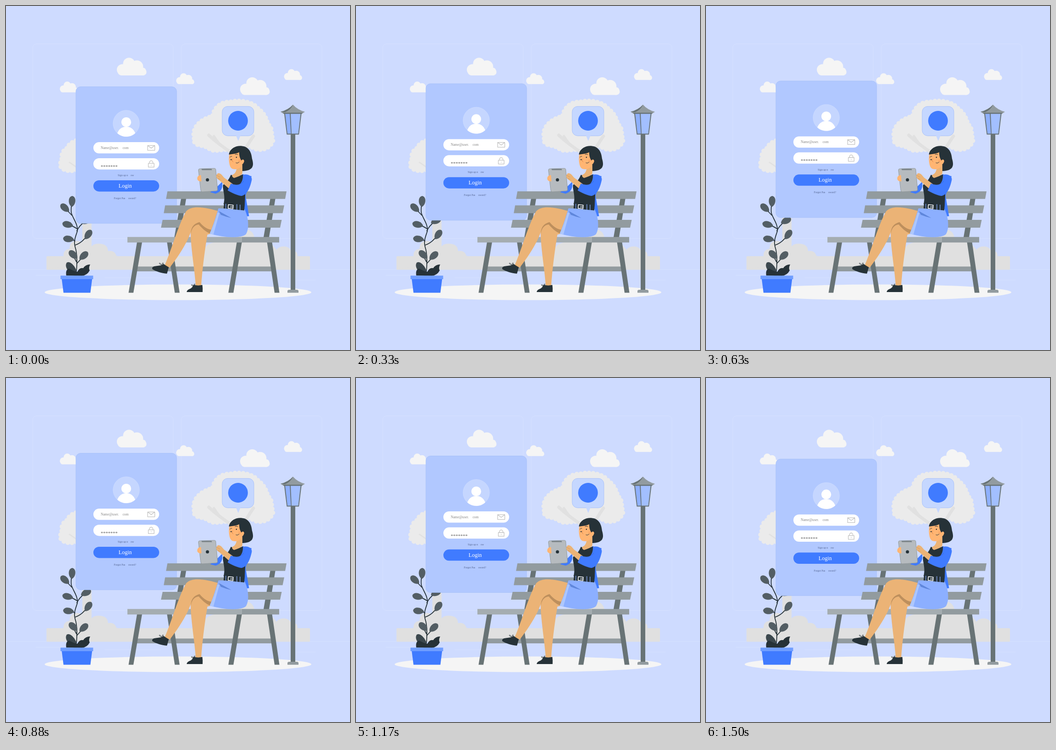
Animation, 748 px wide and 748 px high, one loop 1540 ms. Source, as an HTML page:

```html
<!DOCTYPE html>
<html lang="en">
<head>
<meta charset="utf-8">
<title>Login</title>
<style>
  html, body { margin: 0; width: 100%; height: 100%; overflow: hidden; background: #cedbff; }
  svg { display: block; width: 100%; height: 100%; }
  text { font-family: "Liberation Serif", "Times New Roman", serif; white-space: pre; }
  .steel { fill: #929b9f; }
  .iron { fill: #687375; }
  .ink { fill: #263238; }
  .skin { fill: #ebb376; }
  .blue { fill: #407bff; }
  .pale { fill: #e0e0e0; }
  .line { fill: none; stroke-linecap: round; stroke-linejoin: round; }
  .foliage { fill: #ebebeb; stroke: #ebebeb; stroke-width: 10; stroke-linecap: round; stroke-dasharray: 0 9; }
  .small { font-size: 5.8px; fill: #53648f; }
</style>
</head>
<body>
<svg viewBox="0 0 748 748">
  <defs>
    <g id="cloud" fill="#f5f5f5">
      <circle cx="12" cy="26.5" r="12"/><circle cx="26.5" cy="13.5" r="13"/>
      <circle cx="43.5" cy="20" r="13.8"/><circle cx="57.3" cy="31.7" r="7.2"/>
      <rect x="2.5" y="22" width="61" height="16.9" rx="7"/>
    </g>
    <path id="leaf" d="M0 0C-9-5-10-22 0-24C10-22 9-5 0 0Z" fill="#535e64"/>
  </defs>

  <!-- backdrop -->
  <g class="line" stroke="#d6e1ff">
    <rect x="58" y="82.5" width="305.500" height="423" rx="8"/>
    <rect x="381" y="82.5" width="306" height="423" rx="8"/>
    <path d="M0 573H748M65 585.500H119M215 591H336M633 596H673"/>
  </g>
  <use href="#cloud" x="241" y="112"/>
  <use href="#cloud" x="509" y="154.500"/>
  <use href="#cloud" transform="translate(117 164)scale(.61)"/>
  <use href="#cloud" transform="translate(370 146)scale(.61)"/>
  <use href="#cloud" transform="translate(604.500 137)scale(.61)"/>

  <!-- trees and hedge -->
  <path class="foliage" d="M170 290C148 291 137 298 131 312C117 318 124 326 120 338C113 350 125 360 145 358L180 350Z"/>
  <path class="line" stroke="#e2e2e2" stroke-width="3" d="M138 340L160 355"/>
  <path class="foliage" d="M409 288C404 268 418 247 449 240C453 220 467 208 486 209C506 203 538 208 548 223C564 235 566 246 570 258C581 264 575 280 581 290C578 307 560 316 542 311L520 300L500 310L460 314C444 317 440 306 427 304C416 303 407 299 409 288Z"/>
  <g class="line" stroke="#e1e1e1">
    <path stroke-width="7" d="M441 281Q461 300 492 320M538 283Q526 300 512 325"/>
    <path stroke-width="5" d="M452 283L464 300"/>
  </g>
  <g class="pale">
    <path d="M166 455H186V545H166Z"/>
    <rect x="88" y="544" width="573" height="29.500" rx="2"/>
    <path d="M88 573V553Q89 543 100 544L125 545Q124 530 138 528Q139 509 158 511L187 522Q192 516 205 517Q221 518 222 533Q236 530 240 543L250 546Z"/>
    <path d="M425 546Q430 518 452 514H575L588 530Q595 521 608 523Q619 526 620 534Q634 530 634 544L661 546V573H430Z"/>
    <circle cx="521" cy="505" r="19"/>
  </g>
  <ellipse cx="374" cy="622.500" rx="290" ry="17" fill="#f5f5f5"/>

  <!-- plant -->
  <g class="line" stroke="#263238" stroke-width="1.800">
    <path d="M152 586C155 562 155 545 152 530C146 512 150 505 155 490C157 475 147 465 142 450C141 442 142 434 143 428"/>
    <path d="M143 455L127 438M154 484Q142 476 130 475M154 489Q160 477 170 470M150 511Q143 507 133 506M150 520Q166 515 178 497M153 556L144 538M154 560L171 541"/>
  </g>
  <g id="leaves"></g>
  <path fill="#3c484e" d="M149 587C137 580 126 568 132 558C139 553 151 566 153 576Z"/>
  <path class="ink" d="M131 586Q129 573 137 571Q151 578 155 578Q160 568 168 570Q173 562 183 562Q179 570 182 575Q177 585 165 587Z"/>
  <path class="blue" d="M121 592H187.500L183.500 623.500H125Z"/>
  <rect x="118.500" y="586.300" width="71" height="7.700" fill="#709eff"/>

  <!-- login card -->
  <g id="card">
    <rect x="152" width="219" height="297" rx="10" fill="#b1c8ff" stroke="#a4bff8" stroke-width=".8"/>
    <circle cx="261.500" cy="79.800" r="28.600" fill="#c5d6ff" stroke="#d0deff" stroke-width=".8"/>
    <g fill="#fff">
      <path d="M242 101C246 91 253 87 261.500 87S277 91 281 101C271 111 252 111 242 101Z"/>
      <circle cx="261.500" cy="77" r="10.600"/>
      <rect x="190" y="120.500" width="143" height="24.500" rx="12.250"/>
      <rect x="190" y="155.300" width="143" height="24.500" rx="12.250"/>
    </g>
    <rect class="blue" x="190" y="203.300" width="143" height="24.500" rx="12.250"/>
    <g class="line" stroke="#c3c3c3" stroke-width="1.300">
      <path d="M308 127.700H323.500V138.200H308ZL315.700 133.500L323.500 127.700"/>
      <path d="M309.500 166.500H322V174.700H309.500ZM312 166V164.500a3.700 3.700 0 0 1 7.400 0V166M315.700 170.300V171"/>
    </g>
    <g font-size="7.600" fill="#858585">
      <text x="206" y="135">Name@user.</text><text x="253.500" y="135">com</text>
    </g>
    <text x="206" y="177" font-size="10.500" fill="#666">*******</text>
    <g class="small">
      <text x="243" y="194.500">Sign up n</text><text x="271" y="194.500">ow</text>
      <text x="234.500" y="244.300">Forgot Pas</text><text x="266" y="244.300">sword?</text>
    </g>
    <text x="244.800" y="219.300" font-size="12" fill="#fff">Login</text>
  </g>

  <!-- street lamp -->
  <path class="iron" d="M619 277H629V619H619Z"/>
  <path class="steel" d="M612 623.500V620Q612 617 616 617H632Q636 617 636 620V623.500Z"/>
  <path class="iron" d="M604.500 231H643L637 279.500H610.500Z"/>
  <path fill="#8eb0ff" d="M607 234H617L619.500 277.500H612Z"/>
  <path fill="#a2bfff" d="M619 234H640.500L635.500 277.500H621Z"/>
  <path class="steel" d="M597 230Q614 226 624 214.500Q634 226 650 230L644 234H603Z"/>
  <path class="iron" d="M597 230Q614 226 624 214.500Q619 226 607 231ZM602 232H645L643 234.500H604Z"/>

  <!-- speech bubble -->
  <rect x="470" y="218.300" width="69" height="64" rx="12" fill="#c5d7ff" stroke="#a6c0fa" stroke-width=".9"/>
  <path fill="#c5d7ff" d="M500 281.500H510L505 293.500Z"/>
  <circle class="blue" cx="504.500" cy="249.500" r="21.400"/>

  <!-- bench -->
  <g class="iron">
    <path d="M381 417H392L378 503H366ZM575 417H586L572 503H560Z"/>
  </g>
  <path class="steel" d="M351 403H610L607 419.500H348ZM346 433.500H605L601.500 450.500H343ZM340.500 465H599.500L596 482H337ZM283 566.500H579.500V577H283Z"/>
  <path class="iron" d="M285 513H296L277 623.500H266.500ZM350 513H360.500L377.500 623.500H367ZM502 513H513L494.500 623.500H483.500ZM567.500 513H578.500L594.500 623.500H584Z"/>
  <path fill="#a5adb1" d="M264 502.300H512.500V514.300H264Z"/>
  <path class="steel" d="M512.500 502.300H594V514.300H512.500Z"/>

  <!-- legs and shoes -->
  <g class="skin">
    <path d="M402 478C399 512 409 560 412.500 608H424.500C427 570 433 526 438 497L460 492L440 462Z"/>
    <path d="M466 447C435 438 405 432 392 446C376 472 360 530 345 564L356 569C374 545 396 514 405 482Q412 474 421 471Q432 484 448 491Z"/>
  </g>
  <path fill="#bd8f5d" d="M402 496C402 480 409 473 421 470C429 480 437 485 448 487L444 495C434 491 425 482 419 475Q404 477 402 496Z"/>
  <path class="ink" d="M318 569C322 563 336 567 343 561Q350 566 354 568Q352 575 350 582C338 581 325 577 318 572ZM393 622Q393 617 402 614Q406 611 408 606Q417 609 427 606.500Q428 614 427.500 622Z"/>
  <path class="line" stroke="#263238" d="M340 564C333 555 329 560 340 564C339 555 345 558 340 564M409 609C402 602 400 609 409 609C408 601 414 604 409 609"/>

  <!-- skirt, torso, belt -->
  <path class="blue" d="M513 366L534 370L521 413L528.500 457L517 458L508 410Z"/>
  <path fill="#8cafff" d="M462 440L519 442C529 464 528 486 522 496C512 506 474 504 443 495C449 481 455 463 462 440Z"/>
  <path fill="#adc7ff" d="M460 449L464 450L451 497L443 495Q453 474 460 449Z"/>
  <path fill="#5f86db" d="M463 446L490 461Q477 458 467 454Z"/>
  <path class="ink" d="M489 367Q500 373 516 366C522 390 520 414 519 434L473 431C478 412 470 398 472 389Q483 382 489 367Z"/>
  <path class="ink" d="M474 430.500L519 433.500L518 444.500L473 440Z"/>
  <path stroke="#8cafff" d="M478 430V441M502 431V444M509 432V444" stroke-width="1.200"/>
  <path class="line" stroke="#fff" stroke-width="1.600" d="M483.500 432L494 433L493.500 441L483 440ZM488 437H493"/>

  <!-- head -->
  <path class="ink" d="M485 321C488 309 501 303 513 304.500C529 306 534 320 535 332C540 348 537 358 514 359L498 340Z"/>
  <path class="skin" d="M502 346L514 345V363Q515 368 496 374Q490 371 492 367Q502 364 502 346Z"/>
  <path fill="#ffb573" d="M486 320C483 333 485 351 492 354C503 358 514 351 515 338L513 319L500 313Z"/>
  <path class="ink" d="M484.500 323C495 322 504 320 507 318C507 327 509 333 514 339Q521 337 522 328L513 308L497 309Q486 313 484.500 323Z"/>
  <path fill="#ffb573" d="M510 338Q516 330 518 337Q517 344 510 346Z"/>
  <path class="line" stroke="#263238" d="M487 329Q488 326 491 327M498 323Q501 321 504 323M500 341Q504 343 507 339"/>
  <path class="line" stroke="#e58b4a" d="M493 332Q490 338 494 339"/>
  <circle class="ink" cx="489.500" cy="334" r="1.300"/><circle class="ink" cx="501" cy="329" r="1.300"/>
  <circle cx="508" cy="336" r="3" fill="#ff9d5c" opacity=".5"/>

  <!-- arms and tablet -->
  <path class="blue" d="M470 382C472 396 468 404 456 408L444 405L459 393Z"/>
  <path fill="#b6bbbf" stroke="#929a9e" d="M421 354L453 353Q455.500 353 456 355L460 399Q460 402 457 402L427 404Q424 404 423.500 401L418.500 357Q418.500 354 421 354Z"/>
  <path fill="#7f888d" d="M425 354H447L448 357H426Z"/>
  <circle class="ink" cx="438" cy="378" r="3.500"/>
  <path fill="#ffb573" d="M421 368Q415 370 416 377Q418 382 425 381L424 368Z"/>
  <path class="skin" d="M460 364Q464 362 469 367L474 373L493 387L487 399L464 379Q457 375 457 369Z"/>
  <path class="line" stroke="#cf985c" stroke-width=".8" d="M458 368L465 372M460 375L466 377"/>
  <path class="blue" d="M515 367C527 364 537 371 534 380C530 398 523 411 512 413C503 412 490 406 482 401L489 386C499 390 507 389 510 386Q516 378 515 367Z"/>
  <path class="line" stroke="#2e62d9" stroke-width=".8" d="M510 386Q514 385 517 381"/>
</svg>
<script>
  // base x, base y, angle
  const leaves = [
    [143, 437, 3], [137, 447, -48], [146, 478, -77], [163, 472, 65],
    [148, 508, -83], [172, 507, 34], [155, 549, -47], [160, 551, 48]
  ];
  document.getElementById('leaves').innerHTML = leaves.map(([x, y, angle]) =>
    `<use href="#leaf" transform="translate(${x} ${y})rotate(${angle})"/>`).join('');

  const LOOP = 1540, STEPS = 37, TOP = 160.8, SPEED = 0.84, TURN = 17.64;
  const card = document.getElementById('card');

  // The card floats up and down at constant speed, in film-rate steps.
  function draw(now) {
    const step = Math.floor((now % LOOP) / LOOP * STEPS + 0.2) % STEPS;
    const away = Math.abs(step - TURN);
    const y = TOP + SPEED * Math.min(away, STEPS - away);
    card.setAttribute('transform', `translate(0 ${y.toFixed(2)})`);
    requestAnimationFrame(draw);
  }
  draw(0);
</script>
</body>
</html>
```
